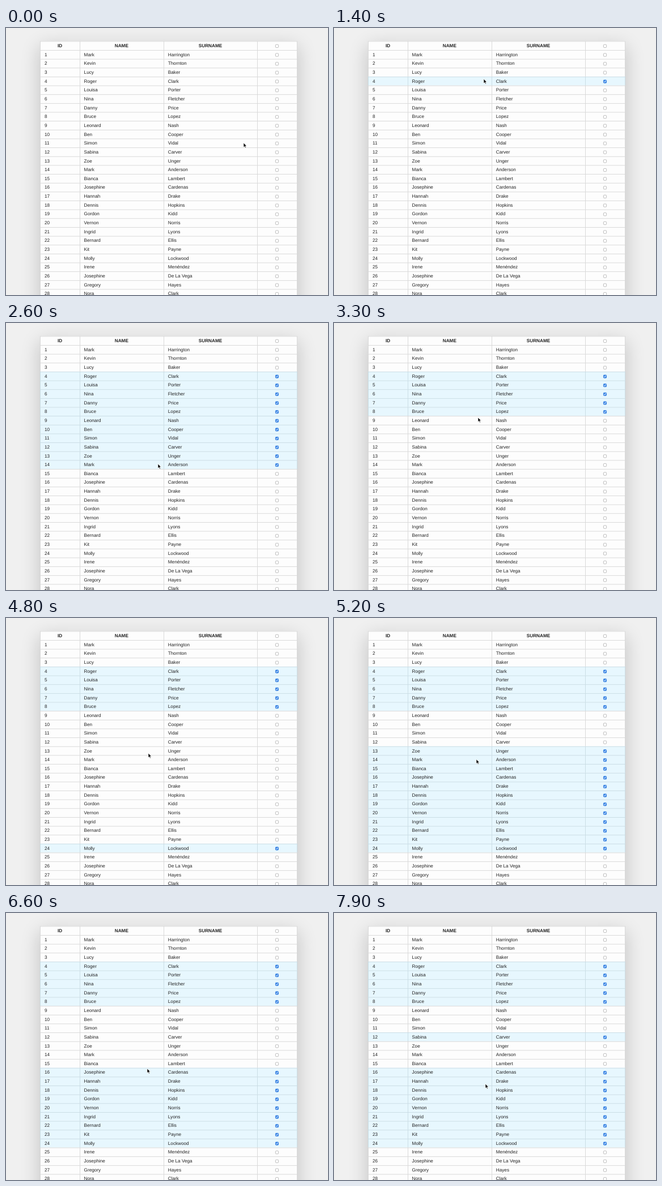
Animation of 568x472 px, one loop 8 s. Source, as an HTML page:

```html
<!DOCTYPE html>
<html lang="en">
<head>
<meta charset="utf-8">
<title>Selectable table</title>
<style>
  html, body { margin: 0; width: 100%; height: 100%; overflow: hidden; background: #f0f0f0; }
  #view { position: relative; width: 100%; height: 100%; overflow: hidden; contain: strict; }
  #card { position: absolute; left: 60px; top: 23px; width: 454px; height: 520px;
    background: #fdfdfd; box-shadow: 0 10px 32px rgba(0, 0, 0, .2); }
  svg { position: absolute; left: 0; top: 0; width: 100%; height: 100%; }
  text { font: 8.2px "Liberation Sans", Arial, sans-serif; fill: #222; text-rendering: geometricPrecision; }
  .head { font-weight: bold; text-anchor: middle; }
  .line { fill: #d6d6d6; }
  .fill { fill: none; }
  .box { fill: #fff; stroke: #adadad; stroke-width: .8; }
  .tick { fill: none; stroke: none; stroke-width: 1; }
  .on .fill { fill: #e7f7fe; }
  .on .line { fill: #c8dbe3; }
  .on .box { fill: #3b88ea; stroke: #2f78d8; }
  .on .tick { stroke: #fff; }
</style>
</head>
<body>
<div id="view"><div id="card"></div><svg id="stage"></svg></div>
<script>
const people = `Mark Harrington,Kevin Thornton,Lucy Baker,Roger Clark,Louisa Porter,Nina Fletcher,
Danny Price,Bruce Lopez,Leonard Nash,Ben Cooper,Simon Vidal,Sabina Carver,Zoe Unger,Mark Anderson,
Bianca Lambert,Josephine Cardenas,Hannah Drake,Dennis Hopkins,Gordon Kidd,Vernon Norris,Ingrid Lyons,
Bernard Ellis,Kit Payne,Molly Lockwood,Irene Menéndez,Josephine De La Vega,Gregory Hayes,Nora Clark`
  .split(",").map(s => s.trim());

const LOOP = 8000, STEP = 100, TOP = 39, PITCH = 15.65;
const LEFT = 60, RIGHT = 513, COLUMNS = [60, 130, 278, 443, 513];

// Clicks: time, first row, last row, selected or not
const clicks = [
  [1400, 4, 4, true], [2600, 4, 14, true], [3300, 9, 14, false], [4400, 24, 24, true],
  [5100, 13, 24, true], [5800, 13, 20, false], [6600, 16, 20, true], [7700, 12, 12, true]
];

// Pointer stops: arrival, departure, x, y
const stops = [
  [0, 0, 419, 203], [200, 400, 367, 176], [1200, 1600, 264, 90], [2200, 2600, 268, 249],
  [3200, 3400, 254, 167], [3700, 3900, 260, 357], [4200, 4400, 269, 406], [4800, 5100, 251, 239],
  [5600, 5800, 251, 342], [6400, 6900, 249, 275], [7300, 7700, 260, 218], [7900, 8000, 267, 302]
];

const text = (x, y, s, cls = "") => `<text x="${x}" y="${y}" class="${cls}">${s}</text>`;
const rect = (x, y, w, h, cls) => `<rect x="${x}" y="${y}" width="${w}" height="${h}" class="${cls}"/>`;
const grid = (y, h) => rect(LEFT, y, RIGHT - LEFT + 1, .9, "line") +
  COLUMNS.map(x => rect(x, y, .9, h, "line")).join("");
const checkbox = y => `<g transform="translate(478 ${y})">
  <rect x="-2.6" y="-2.6" width="5.2" height="5.2" rx="1.1" class="box"/>
  <path d="M-1.6 .1L-.5 1.4L1.6 -1.6" class="tick"/></g>`;

function row(person, i) {
  const y = TOP + i * PITCH, base = y + 10.7;
  const [first, ...last] = person.split(" ");
  return `<g class="row">${rect(LEFT, y, RIGHT - LEFT, PITCH, "fill")}${grid(y, PITCH)}
    ${text(68, base, i + 1)}${text(137.6, base, first)}${text(285.8, base, last.join(" "))}
    ${checkbox(y + 8.6)}</g>`;
}

const stage = document.getElementById("stage");
stage.innerHTML = grid(TOP - PITCH, PITCH) +
  text(95, 34, "ID", "head") + text(203.8, 34, "NAME", "head") + text(360.5, 34, "SURNAME", "head") +
  checkbox(31.9) + people.map(row).join("") +
  `<path id="pointer" d="M0 0V7.8L1.8 6.2L3 9L4.4 8.4L3.2 5.7H5.6Z"
    fill="#000" stroke="#fff" stroke-width=".7" stroke-linejoin="round"/>`;
const rows = [...stage.querySelectorAll(".row")];
const pointer = document.getElementById("pointer");

function pointerAt(t) {
  const i = stops.findLastIndex(s => s[0] <= t);
  const [, leave, x, y] = stops[i], next = stops[i + 1];
  if (!next || t <= leave) return [x, y];
  const p = (t - leave) / (next[0] - leave), e = p * p * (3 - 2 * p);
  return [x + (next[2] - x) * e, y + (next[3] - y) * e];
}

function draw(now) {
  const t = Math.floor(now % LOOP / STEP) * STEP;
  const past = clicks.filter(c => c[0] <= t);
  rows.forEach((el, i) => {
    const hit = past.findLast(([, a, b]) => i + 1 >= a && i + 1 <= b);
    el.classList.toggle("on", !!hit && hit[3]);
  });
  pointer.setAttribute("transform", `translate(${pointerAt(t)})`);
}

const start = performance.now();
function tick() {
  draw(performance.now() - start);
  requestAnimationFrame(tick);
}
tick();
</script>
</body>
</html>
```
